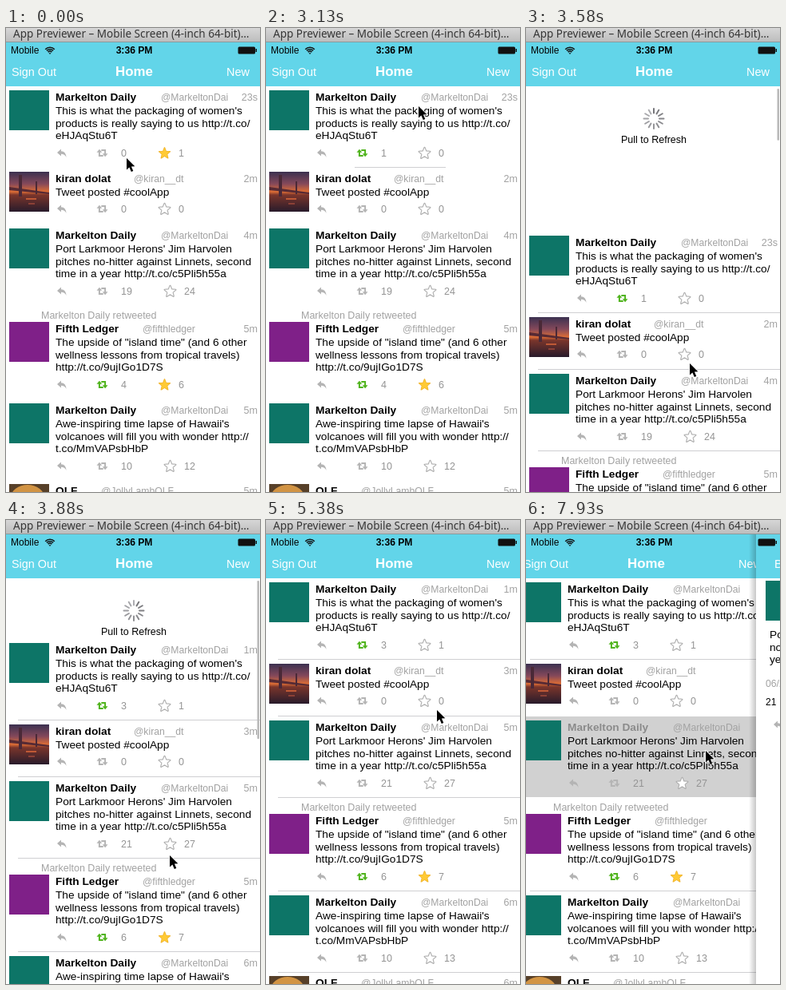
Write an HTML page with a canvas that moves like this. It is 318x581 px and loops after 8 s.

```html
<!DOCTYPE html>
<html lang="en">
<head>
<meta charset="utf-8">
<title>Timeline</title>
<style>
html, body { margin: 0; width: 100%; height: 100%; overflow: hidden; background: #fff; }
canvas { display: block; width: 318px; height: 581px; }
</style>
</head>
<body>
<canvas id="stage"></canvas>
<script>
const W = 318, H = 581, LOOP = 8000, LIST_TOP = 73;
const SANS = '"Liberation Sans", Arial, sans-serif';
const GREY = '#a2a2a2', ICON = '#b4b4b4', GREEN = '#4fb31c', CYAN = '#62d5e9', LINE = '#cfcfd2';
const TEAL = '#0d7567', PURPLE = '#7f2088';

const canvas = document.getElementById('stage');
const ctx = canvas.getContext('2d');
const ratio = window.devicePixelRatio || 1;
canvas.width = W * ratio;
canvas.height = H * ratio;

// Each value pair is [before refresh, after refresh].
const rows = [
  { top: 74, name: 'Markelton Daily', handle: '@MarkeltonDai', handleX: 194, avatar: TEAL,
    age: ['23s', '1m'], retweets: ['1', '3'], stars: ['0', '1'],
    text: ["This is what the packaging of women's", 'products is really saying to us http://t.co/', 'eHJAqStu6T'] },
  { top: 176, name: 'kiran dolat', handle: '@kiran__dt', handleX: 160, avatar: 'dusk',
    age: ['2m', '3m'], retweets: ['0', '0'], stars: ['0', '0'],
    text: ['Tweet posted #coolApp'] },
  { top: 247, name: 'Markelton Daily', handle: '@MarkeltonDai', handleX: 194, avatar: TEAL,
    age: ['4m', '5m'], retweets: ['19', '21'], stars: ['24', '27'],
    text: ["Port Larkmoor Herons' Jim Harvolen", 'pitches no-hitter against Linnets, second', 'time in a year http://t.co/c5Pli5h55a'] },
  { top: 364, name: 'Fifth Ledger', handle: '@fifthledger', handleX: 171, avatar: PURPLE,
    note: 'Markelton Daily retweeted', shared: true, starred: true,
    age: ['5m', '5m'], retweets: ['4', '6'], stars: ['6', '7'],
    text: ['The upside of "island time" (and 6 other', 'wellness lessons from tropical travels)', 'http://t.co/9ujIGo1D7S'] },
  { top: 466, name: 'Markelton Daily', handle: '@MarkeltonDai', handleX: 194, avatar: TEAL,
    age: ['5m', '6m'], retweets: ['10', '10'], stars: ['12', '13'],
    text: ["Awe-inspiring time lapse of Hawaii's", 'volcanoes will fill you with wonder http://', 't.co/MmVAPsbHbP'] },
  { top: 567, name: 'OLF', handle: '@JollyLambOLF', handleX: 119, avatar: 'bear',
    age: ['5m', '6m'], retweets: ['0', '0'], stars: ['0', '0'], text: [] }
];
const separators = [174, 245, 347, 464, 566];

// Pointer moves: first step, last step, number of steps, path.
const moves = [
  [150, 1190, 8, [[151, 163], [140, 165], [124, 160], [114, 156], [114, 156]]],
  [1490, 2230, 6, [[114, 156], [140, 158], [175, 160], [197, 157], [197, 157]]],
  [2530, 3580, 8, [[197, 157], [197, 150], [196, 140], [195, 126], [193, 110], [191, 98], [195, 150], [200, 290], [205, 420]]],
  [4630, 4930, 3, [[205, 420], [206, 390], [216, 330], [230, 270]]],
  [5230, 5530, 3, [[230, 270], [224, 250], [214, 238], [210, 240]]],
  [5980, 6880, 7, [[210, 240], [210, 232], [213, 228], [222, 240], [235, 262], [250, 285], [243, 290], [231, 290]]],
  [7030, 7480, 4, [[231, 290], [222, 300], [213, 304], [218, 295], [225, 289]]]
];
const pulls = [[0, 0], [3280, 30], [3430, 115], [3580, 182], [3730, 90], [3880, 76], [4030, 30], [4180, 0]];

function pointerAt(t) {
  let pos = moves[0][3][0];
  for (const [first, last, steps, path] of moves) {
    if (t < first) break;
    const step = Math.min(steps, Math.floor((t - first) / (last - first) * (steps - 1) + 0.001) + 1);
    const u = step / steps * (path.length - 1);
    const i = Math.min(path.length - 2, Math.floor(u)), f = u - i;
    pos = [0, 1].map(k => path[i][k] + (path[i + 1][k] - path[i][k]) * f);
  }
  return pos;
}

function pullAt(t) {
  return pulls.filter(p => p[0] <= t).pop()[1];
}

function label(str, x, y, size, color = '#000', style = '', align = 'left', family = SANS) {
  ctx.font = `${style} ${size}px ${family}`;
  ctx.fillStyle = color;
  ctx.textAlign = align;
  ctx.fillText(str, x, y);
}

function rect(x, y, w, h, color) {
  ctx.fillStyle = color;
  ctx.fillRect(x, y, w, h);
}

function shape(points, fill, stroke, width = 1) {
  ctx.beginPath();
  points.forEach(([x, y]) => ctx.lineTo(x, y));
  ctx.closePath();
  if (stroke) {
    ctx.strokeStyle = stroke;
    ctx.lineWidth = width;
    ctx.lineJoin = 'round';
    ctx.stroke();
  }
  if (fill) {
    ctx.fillStyle = fill;
    ctx.fill();
  }
}

function at(x, y, draw) {
  ctx.save();
  ctx.translate(x, y);
  draw();
  ctx.restore();
}

function clipped(x, y, w, h, draw) {
  ctx.save();
  ctx.beginPath();
  ctx.rect(x, y, w, h);
  ctx.clip();
  draw();
  ctx.restore();
}

function replyIcon(x, y) {
  at(x, y, () => {
    ctx.beginPath();
    ctx.moveTo(-6, -1);
    ctx.lineTo(-1, -5.5);
    ctx.lineTo(-1, -2.8);
    ctx.quadraticCurveTo(5, -2.5, 5.5, 5);
    ctx.quadraticCurveTo(3.5, 0.8, -1, 0.8);
    ctx.lineTo(-1, 3.5);
    ctx.closePath();
    ctx.fillStyle = ICON;
    ctx.fill();
  });
}

function retweetIcon(x, y, color) {
  at(x, y, () => {
    for (let i = 0; i < 2; i++) {
      ctx.beginPath();
      ctx.moveTo(1.2, 3.6);
      ctx.lineTo(-3.6, 3.6);
      ctx.lineTo(-3.6, -1.5);
      ctx.strokeStyle = color;
      ctx.lineWidth = 2;
      ctx.lineJoin = 'miter';
      ctx.stroke();
      shape([[-7, -0.8], [-3.6, -4.8], [-0.2, -0.8]], color);
      ctx.rotate(Math.PI);
    }
  });
}

function starIcon(x, y, gold) {
  const points = Array.from({ length: 10 }, (_, i) => {
    const r = i % 2 ? 3.2 : 7.2, a = i * Math.PI / 5 - Math.PI / 2;
    return [x + r * Math.cos(a), y + r * Math.sin(a)];
  });
  shape(points, gold ? '#ffca35' : '#fff', gold ? '#eeb02a' : '#acacac', gold ? 1.4 : 2.2);
}

function avatar(kind, x, y) {
  if (kind === 'dusk') {
    const sky = ctx.createLinearGradient(0, y, 0, y + 50);
    [[0, '#3b3150'], [0.3, '#84485a'], [0.5, '#dc6d35'], [0.58, '#7a352b'], [1, '#281b2b']]
      .forEach(([stop, color]) => sky.addColorStop(stop, color));
    rect(x, y, 50, 50, sky);
    shape([[x, y + 19], [x + 50, y + 26], [x + 50, y + 28], [x, y + 23]], '#572a34');
    rect(x + 12, y + 4, 4, 27, '#4a2937');
    rect(x + 33, y + 12, 2, 16, '#4a2937');
    rect(x + 21, y + 33, 13, 2, '#bf5935');
    rect(x + 24, y + 39, 8, 2, '#8b4036');
  } else if (kind === 'bear') {
    rect(x, y, 50, 50, '#574029');
    ctx.fillStyle = '#d29444';
    ctx.beginPath();
    ctx.ellipse(x + 23, y + 17, 21, 16, 0, 0, 7);
    ctx.fill();
  } else {
    rect(x, y, 50, 50, kind);
  }
}

function drawRow(row, t, selected) {
  const fresh = t >= 3880 ? 1 : 0;
  const base = row.top + 17, y = base + 17 + row.text.length * 16;
  let shares = row.retweets[fresh], likes = row.stars[fresh];
  let { shared, starred } = row;
  if (row === rows[0]) {
    shared = t >= 1040;
    starred = t < 2230;
    if (!shared) shares = '0';
    if (starred) likes = '1';
  }
  const wide = shares.length > 1 ? 7 : 0;

  avatar(row.avatar, 4, row.top + 4);
  if (row.note) label(row.note, 44, base - 17, 12.5, GREY);
  label(row.name, 62, base, 13.7, selected ? '#8b8b8b' : '#000', 'bold');
  label(row.handle, row.handleX, base - 0.5, 12.2, GREY);
  label(row.age[fresh], 315, base - 0.5, 12.6, GREY, '', 'right');
  row.text.forEach((line, i) => label(line, 62, base + 17 + i * 15.5, 13.7));
  if (!row.text.length) return;

  replyIcon(70, y + 1);
  retweetIcon(120.5, y + 0.5, shared ? GREEN : ICON);
  label(shares, 144, y + 4.5, 12.5, '#949494');
  starIcon(198.5 + wide, y + 1, starred);
  label(likes, 216 + wide, y + 4.5, 12.5, '#949494');
}

function spinner(t, pull) {
  const turn = t >= 3730 ? Math.floor((t - 3730) / 80) : 0;
  const visible = t >= 3580 ? 12 : Math.round(pull / 12);
  ctx.lineWidth = 2;
  ctx.lineCap = 'round';
  for (let i = 0; i < visible; i++) {
    const a = i * Math.PI / 6 - Math.PI / 2, c = Math.cos(a), s = Math.sin(a);
    const shade = 118 + (12 + i - turn % 12) % 12 * 5;
    ctx.strokeStyle = `rgb(${shade},${shade},${shade + 4})`;
    ctx.beginPath();
    ctx.moveTo(160 + 7 * c, 113.5 + 7 * s);
    ctx.lineTo(160 + 12.5 * c, 113.5 + 12.5 * s);
    ctx.stroke();
  }
  ctx.lineCap = 'butt';
  label('Pull to Refresh', 160, 144, 12.5, '#000', '', 'center');
}

function drawList(t, pull, pushing) {
  if (pull) clipped(0, LIST_TOP, W, pull, () => spinner(t, pull));
  at(pushing ? -10 : 0, pull, () => {
    if (pushing) rect(0, 246, W + 10, 101, '#d1d1d1');
    if (t >= 3280) {
      separators.forEach(y => {
        if (!pushing || (y !== 245 && y !== 347)) rect(15, y, W, 1, LINE);
      });
    } else if (t >= 150) {
      rect(111, 174, t < 1490 ? 54 : 114, 1, LINE);
    }
    rows.forEach(row => drawRow(row, t, pushing && row === rows[2]));
  });
  if (t >= 3280 && t < 4330) {
    ctx.fillStyle = '#b9b9b9';
    ctx.beginPath();
    ctx.roundRect(314.5, 76, 2.5, 294 - pull * 1.26, 1.2);
    ctx.fill();
  }
}

function drawDetail() {
  at(288, 0, () => {
    rect(0, LIST_TOP, W, H, '#fff');
    avatar(TEAL, 12, 76);
    ["Port Larkmoor Herons' Jim Harvolen", 'no-hitter against Linnets, second time in a', 'year http://t.co/c5Pli5h55a']
      .forEach((line, i) => label(line, 17, 148 + i * 15.5, 13.7));
    label('06/25/14', 12, 209, 12.2, GREY);
    label('21', 12, 232, 12);
    replyIcon(28, 257);
    label('Back', 23, 59.5, 14.5, '#fff');
  });
}

function drawStatus() {
  label('Mobile', 6, 32, 12);
  ctx.strokeStyle = '#111';
  ctx.lineWidth = 1.6;
  [3.4, 5.8, 8.2].forEach(r => {
    ctx.beginPath();
    ctx.arc(55, 32.5, r, -Math.PI * 0.75, -Math.PI * 0.25);
    ctx.stroke();
  });
  shape([[55, 33], [53.5, 31.2], [56.5, 31.2]], '#111');
  label('3:36 PM', 160.5, 32, 12.1, '#000', 'bold', 'center');
  ctx.fillStyle = '#111';
  ctx.beginPath();
  ctx.roundRect(290.5, 23.5, 21.5, 9, 1.5);
  ctx.fill();
  rect(312.5, 26, 1.5, 4, '#111');
}

function drawTitleBar() {
  const metal = ctx.createLinearGradient(0, 0, 0, 18);
  metal.addColorStop(0, '#d6d6d6');
  metal.addColorStop(1, '#bcbcbc');
  rect(0, 0, W, 18, metal);
  rect(0, 17, W, 1, '#8c9a9d');
  label('App Previewer – Mobile Screen (4-inch 64-bit)…', 9, 11.5, 13.5, '#363636', '', 'left', '"Noto Sans", sans-serif');
}

function drawPointer([x, y]) {
  at(x, y, () => shape([[0, 0], [0, 14.5], [3.4, 11.5], [5.8, 17], [8.3, 16], [5.9, 10.6], [10.3, 10.3]], '#000', '#fff', 1.8));
}

function draw(t) {
  const pushing = t >= 7930, pull = pullAt(t);
  ctx.setTransform(ratio, 0, 0, ratio, 0, 0);
  rect(0, 0, W, H, '#fff');
  rect(0, 18, W, LIST_TOP - 18, CYAN);

  clipped(0, 18, pushing ? 288 : W, H, () => {
    at(pushing ? -10 : 0, 0, () => {
      label('Sign Out', 7, 59.5, 14.4, '#fff');
      label('Home', 160.5, 60, 16.9, '#fff', 'bold', 'center');
      label('New', 276, 59.5, 14.4, '#fff');
    });
    clipped(0, LIST_TOP, W, H, () => drawList(t, pull, pushing));
    if (pushing) {
      const shadow = ctx.createLinearGradient(279, 0, 288, 0);
      shadow.addColorStop(0, 'rgba(0,0,0,0)');
      shadow.addColorStop(1, 'rgba(0,0,0,.22)');
      rect(279, 18, 9, H, shadow);
    }
  });
  if (pushing) drawDetail();

  drawStatus();
  drawTitleBar();
  drawPointer(pointerAt(t));
}

function tick() {
  draw(performance.now() % LOOP);
  requestAnimationFrame(tick);
}
tick();
</script>
</body>
</html>
```
